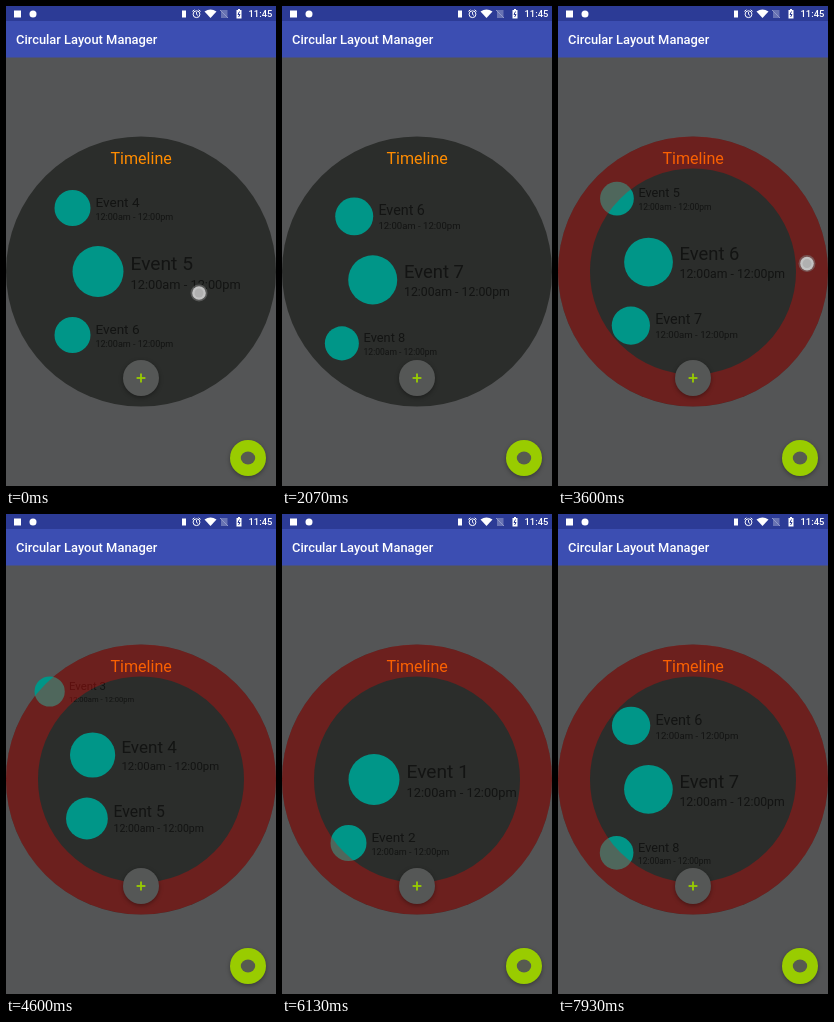
An HTML page with a canvas for the animation above (8 s loop, 270 by 480 pixels).

```html
<!DOCTYPE html>
<html lang="en">
<head>
<meta charset="utf-8">
<title>Circular Layout Manager</title>
<style>
  html, body { margin: 0; width: 100%; height: 100%; overflow: hidden; background: #545556; }
  canvas { display: block; width: 270px; height: 480px; }
</style>
</head>
<body>
<canvas id="stage"></canvas>
<script>
const canvas = document.getElementById('stage');
const ctx = canvas.getContext('2d');
const dpr = window.devicePixelRatio || 1;
canvas.width = 270 * dpr;
canvas.height = 480 * dpr;

const LOOP = 8000, RING_ON = 2950;
const CENTER = { x: 135, y: 265.5 };
const SPACING = 63.5, ARC = 121, EVENTS = 10;
const GREEN = '#99cc00', TEAL = '#009688', INK = '#131413';

// Each swipe scrolls the list to event `to`; the finger lands at (x, y) and stays `hold` ms.
const START_EVENT = 5, TOUCH_LEAD = 70;
const swipes = [
  { start: 70, end: 900, to: 1, x: 193, y: 287, hold: 170 },
  { start: 1030, end: 2500, to: 7, x: 167, y: 377, hold: 240 },
  { start: 2850, end: 2950, to: 7, x: 242, y: 452, hold: 100 },
  { start: 3490, end: 4330, to: 1, x: 249, y: 203.5, hold: 150 },
  { start: 4400, end: 5200, to: 10, x: 245, y: 330, hold: 110 },
  { start: 5470, end: 6130, to: 1, x: 249, y: 215, hold: 50 },
  { start: 6230, end: 7050, to: 2, x: 249, y: 300, hold: 200 },
  { start: 7470, end: 8145, to: 7, x: 243, y: 290, hold: 110 }
];

// A short drag that turns into a long decelerating fling.
const fling = u => 1 - (1 - u ** 1.7) ** 4.7;
const clamp01 = v => Math.min(1, Math.max(0, v));

const scrollAt = t => swipes.reduce((event, { start, end, to }) =>
  event + (to - event) * fling(clamp01((t - start) / (end - start))), START_EVENT);

function rect(x, y, w, h, color) {
  ctx.fillStyle = color;
  ctx.fillRect(x, y, w, h);
}

function disc(x, y, r, color, ry = r) {
  ctx.fillStyle = color;
  ctx.beginPath();
  ctx.ellipse(x, y, r, ry, 0, 0, 7);
  ctx.fill();
}

function line(color, width, ...points) {
  ctx.strokeStyle = color;
  ctx.lineWidth = width;
  ctx.beginPath();
  points.forEach(([x, y]) => ctx.lineTo(x, y));
  ctx.stroke();
}

function text(value, x, y, size, color, weight = 400) {
  ctx.font = `${weight} ${size}px Roboto, sans-serif`;
  ctx.fillStyle = color;
  ctx.fillText(value, x, y);
}

function drawStatusBar() {
  rect(0, 0, 270, 15, '#2c3b96');
  rect(8, 4.5, 7, 7, '#fff');
  disc(27, 8, 3.5, '#fff');
  rect(176, 4.5, 4, 7, '#fff');
  // Alarm
  ctx.strokeStyle = '#fff';
  ctx.lineWidth = 1;
  ctx.beginPath();
  ctx.arc(190.5, 8.2, 3.4, 0, 7);
  ctx.stroke();
  line('#fff', .9, [190.5, 6], [190.5, 8.4], [192, 9.4]);
  line('#fff', 1, [186.4, 5.4], [188.4, 3.8]);
  line('#fff', 1, [192.6, 3.8], [194.6, 5.4]);
  // Wi-Fi
  ctx.fillStyle = '#fff';
  ctx.beginPath();
  ctx.moveTo(204.5, 12);
  ctx.lineTo(198.5, 5.4);
  ctx.quadraticCurveTo(204.5, 1.4, 210.5, 5.4);
  ctx.fill();
  // Missing SIM
  rect(215, 4, 6.5, 8, '#6873b3');
  line('#8f98c9', 1, [214, 4], [222, 12]);
  // Battery
  rect(230.5, 4, 5, 8.5, '#fff');
  rect(232, 3, 2, 1, '#fff');
  line('#2c3b96', 1, [233.5, 5.5], [232, 8.5], [234, 8.5], [232.6, 11]);
  text('11:45', 242.5, 11.2, 9.4, '#fff', 500);
}

function drawEvent(index, scroll) {
  const offset = (index - scroll) * SPACING;
  const distance = Math.abs(offset);
  if (distance > SPACING * 1.5) return;
  const scale = 1 - distance * .00463;
  ctx.save();
  ctx.translate(66.5 - ARC + Math.sqrt(ARC ** 2 - distance ** 2), CENTER.y + offset);
  ctx.scale(scale, scale);
  disc(25.5, 0, 25.5, TEAL);
  text('Event ' + index, 58, -1.7, 19.2, INK);
  text('12:00am - 12:00pm', 58, 17, 12.8, INK);
  ctx.restore();
}

function drawRing() {
  ctx.strokeStyle = 'rgba(240,8,5,.33)';
  ctx.lineWidth = 32;
  ctx.beginPath();
  ctx.arc(CENTER.x, CENTER.y, 119, 0, 2 * Math.PI);
  ctx.stroke();
}

function drawButton(x, y, color) {
  ctx.save();
  ctx.shadowColor = 'rgba(0,0,0,.35)';
  ctx.shadowBlur = 4 * dpr;
  ctx.shadowOffsetY = 1.5 * dpr;
  disc(x, y, 18, color);
  ctx.restore();
}

function drawButtons() {
  drawButton(135, 372, '#555756');
  line(GREEN, 1.8, [130.6, 372], [139.4, 372]);
  line(GREEN, 1.8, [135, 367.6], [135, 376.4]);
  drawButton(242, 452, GREEN);
  disc(242, 452, 7.2, '#575b50', 6.5);
}

function drawTouch(t, scroll) {
  const swipe = swipes.find(({ start, hold }) => t >= start - TOUCH_LEAD && t < start + hold);
  if (!swipe) return;
  const y = swipe.y - (scroll - scrollAt(swipe.start)) * SPACING;
  disc(swipe.x, y, 8.5, 'rgba(130,130,130,.5)');
  disc(swipe.x, y, 6.8, '#c2c2c2');
  disc(swipe.x, y, 4.5, '#b0b0b0');
}

function render(t) {
  const scroll = scrollAt(t);
  ctx.setTransform(dpr, 0, 0, dpr, 0, 0);
  rect(0, 0, 270, 480, '#545556');
  rect(0, 15, 270, 36.5, '#3c4eb2');
  drawStatusBar();
  text('Circular Layout Manager', 10, 38, 12.9, '#fff', 500);

  disc(CENTER.x, CENTER.y, 135, '#2b2d2b');
  for (let i = 1; i <= EVENTS; i++) drawEvent(i, scroll);
  text('Timeline', 104.4, 158, 16.1, '#ff8c00');
  if (t >= RING_ON) drawRing();
  drawButtons();
  drawTouch(t, scroll);
}

function tick() {
  render(performance.now() % LOOP);
  requestAnimationFrame(tick);
}
tick();
</script>
</body>
</html>
```
